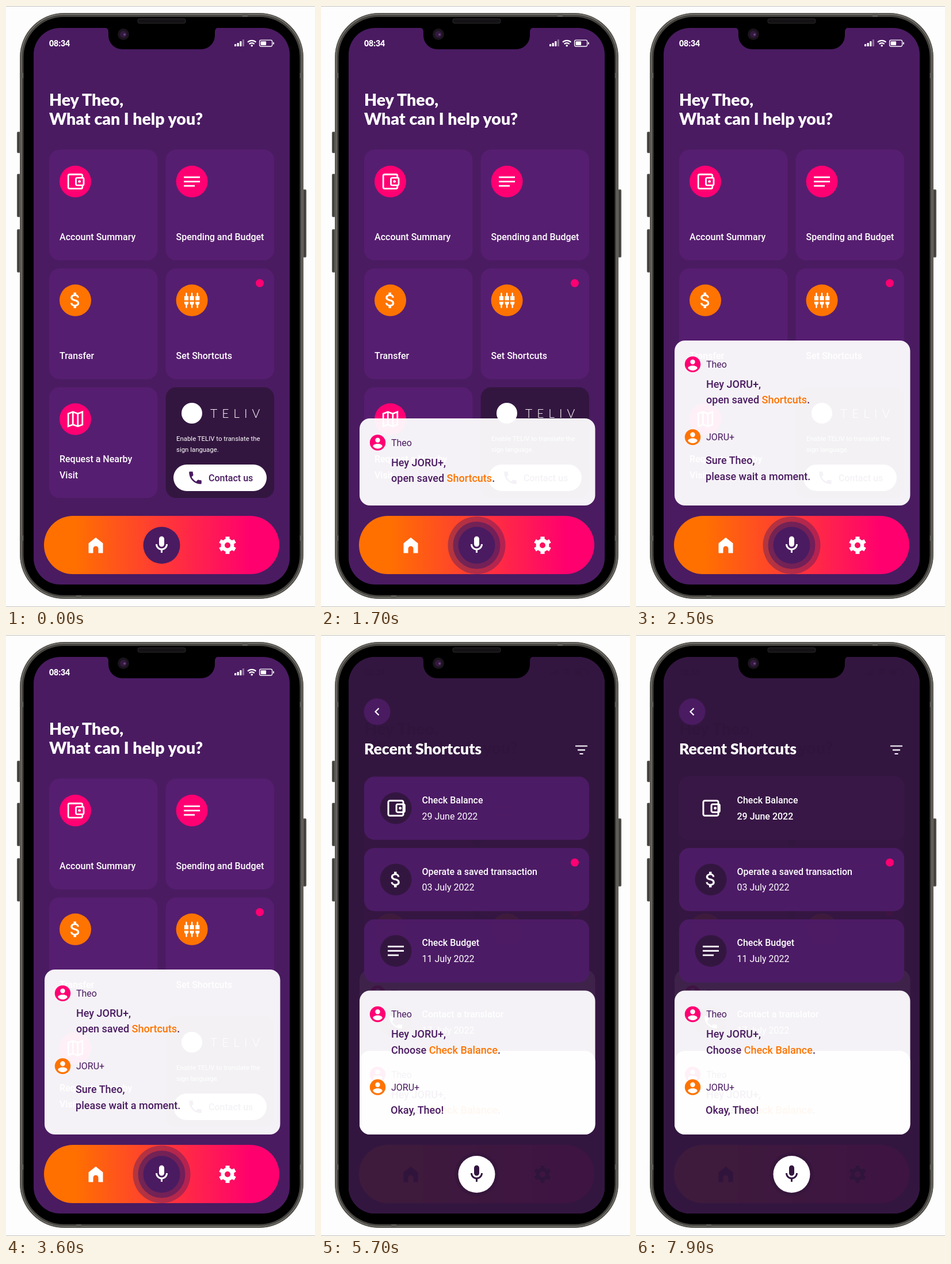
An HTML page for the animation above (8 s loop, 537x1042 px).

```html
<!DOCTYPE html>
<html lang="en">
<head>
<meta charset="utf-8">
<title>Voice banking</title>
<style>
html, body { margin: 0; width: 100%; height: 100%; overflow: hidden; background: #fefdfe; }
svg { display: block; width: 537px; height: 1042px; }
text { font-family: Roboto, Arial, sans-serif; font-size: 16px; white-space: pre; }
.ink { fill: var(--ink, #fff); }
.line { fill: none; stroke: var(--ink, #fff); stroke-width: 2.8; }
.plum { fill: #4a1b61; }
.mid { font-weight: 500; }
.say { font-weight: 500; font-size: 18px; }
.head { font-family: Lato, "Open Sans", sans-serif; font-weight: 900; }
.ghost { --ink: #000; opacity: .055; }
</style>
</head>
<body>
<svg id="stage" viewBox="0 0 537 1042"></svg>
<script>
const PINK = '#ff0073', ORANGE = '#ff7300', PLUM = '#4a1b61', DARK = '#331640';
const USER = 'Theo', BOT = 'JORU+', PARTNER = 'TELIV';
const LOOP = 8000, STEP = 100;

const text = (x, y, s, cls = 'ink mid', extra = '') =>
  `<text x="${x}" y="${y}" class="${cls}" ${extra}>${s}</text>`;
const heading = (x, y, s, size) => text(x, y, s, 'ink head', `style="font-size:${size}px"`);
const rect = (x, y, w, h, r, fill, extra = '') =>
  `<rect x="${x}" y="${y}" width="${w}" height="${h}" rx="${r}" fill="${fill}" ${extra}/>`;
const disc = (x, y, r, fill, extra = '') =>
  `<circle cx="${x}" cy="${y}" r="${r}" fill="${fill}" ${extra}/>`;
const at = (x, y, body, scale = 1) =>
  `<g transform="translate(${x} ${y}) scale(${scale})">${body}</g>`;
const path = (d, cls = 'ink', extra = '') => `<path class="${cls}" d="${d}" ${extra}/>`;
const glyph = d => `<path transform="translate(-12 -12)" d="${d}"/>`;

// Icons are centred on the origin.
const plug = 'M-1-10a1 1 0 0 1 2 0v4h2v6h-6v-6h2zM-3 2h6v2a3 3 0 0 1-2 2.8V11h-2V6.8A3 3 0 0 1-3 4z';
const icon = {
  wallet: `<rect class="line" x="-12.3" y="-12.3" width="24.6" height="24.6" rx="2.5"/>` +
    `<rect class="line" x="1" y="-6.5" width="13.5" height="13" rx="2" style="fill:var(--back)"/>` +
    `<circle class="ink" cx="7.2" r="2.3"/>`,
  lines: path('M-14-7.5h28M-14 0h28M-14 7.5h19', 'line'),
  plugs: [-8, 0, 8].map(x => at(x, 0, path(plug))).join(''),
  map: path('M-12.3-9.5l8-3 8.6 3 8-3v22l-8 3-8.6-3-8 3zM-4.3-12.5v22M4.3-9.5v22', 'line'),
  money: `<g class="ink">${glyph('M11.8 10.9c-2.27-.59-3-1.2-3-2.15 0-1.09 1.01-1.85 2.7-1.85 1.78 0 2.44.85 2.5 2.1h2.21c-.07-1.72-1.12-3.3-3.21-3.81V3h-3v2.16c-1.94.42-3.5 1.68-3.5 3.61 0 2.31 1.91 3.46 4.7 4.13 2.5.6 3 1.48 3 2.41 0 .69-.49 1.79-2.7 1.79-2.06 0-2.87-.92-2.98-2.1h-2.2c.12 2.19 1.76 3.42 3.68 3.83V21h3v-2.15c1.95-.37 3.5-1.5 3.5-3.55 0-2.84-2.43-3.81-4.7-4.4z')}</g>`,
  phone: glyph('M6.62 10.79c1.44 2.83 3.76 5.14 6.59 6.59l2.2-2.2c.27-.27.67-.36 1.02-.24 1.12.37 2.33.57 3.57.57.55 0 1 .45 1 1V20c0 .55-.45 1-1 1-9.39 0-17-7.61-17-17 0-.55.45-1 1-1h3.5c.55 0 1 .45 1 1 0 1.25.2 2.45.57 3.57.11.35.03.74-.25 1.02z'),
  mic: glyph('M12 14c1.66 0 3-1.34 3-3V5c0-1.66-1.34-3-3-3S9 3.34 9 5v6c0 1.66 1.34 3 3 3zm5-3c0 2.76-2.24 5-5 5s-5-2.24-5-5H5c0 3.53 2.61 6.43 6 6.92V21h2v-3.08c3.39-.49 6-3.39 6-6.92z'),
  house: path('M-12.5-3.5L0-13.5 12.5-3.5V13.5H4.5V6a4.5 4.5 0 0 0-9 0v7.5h-8z'),
  gear: `<g class="line"><circle r="8.2" style="stroke-width:6.4"/>` +
    [0, 60, 120].map(a => `<path d="M0-15v5M0 10v5" style="stroke-width:7" transform="rotate(${a})"/>`).join('') + '</g>'
};

const badge = (x, y, color, body, scale = 1) =>
  `<g style="--back:${color}">${disc(x, y, 27.5, color)}${at(x, y, body, scale)}</g>`;

function tile(col, row, color, body, labels, scale) {
  const x = 75 + col * 202.6, y = 249 + row * 206;
  return rect(x, y, 188.5, 192, 18, '#561e70') +
    badge(x + 45.5, y + 55.3, color, body, scale) +
    labels.map((s, i) => text(x + 18, y + 157 + (i - labels.length + 1) * 27.5 + (labels.length - 1) * 12.5 - 0, s)).join('');
}

const visitLabel = text(93, 791, 'Request a Nearby') + text(93, 818.5, 'Visit');

const partnerCard = rect(277.6, 661, 188.5, 192, 18, DARK) +
  disc(323, 706, 18, '#fff') +
  text(355, 714, PARTNER, 'ink', 'style="font:300 21px Lato,sans-serif;letter-spacing:8px"') +
  text(296, 754, `Enable ${PARTNER} to translate the`, 'ink', 'style="font-size:11.4px"') +
  text(296, 773, 'sign language.', 'ink', 'style="font-size:11.4px"') +
  rect(291, 795, 162, 46, 23, '#fff') +
  `<g class="plum">${at(329, 818, icon.phone, 1.2)}</g>` + text(352, 823.5, 'Contact us', 'plum mid');

const statusBar = heading(75, 70, '08:34', 14) +
  [4, 6, 9, 12].map((h, i) => `<rect class="ink" x="${397 + i * 4.6}" y="${70 - h}" width="3.2" height="${h}" rx=".7" opacity="${i < 3 ? 1 : .35}"/>`).join('') +
  path('M420 62.8a10.3 10.3 0 0 1 14.4 0M422.7 66a6.5 6.5 0 0 1 9 0', 'line', 'style="stroke-width:2.2"') +
  `<circle class="ink" cx="427.2" cy="68.8" r="1.8"/>` +
  `<rect class="line" x="440.6" y="59.2" width="22" height="10.8" rx="2.5" style="stroke-width:1.3"/>` +
  `<rect class="ink" x="442.6" y="61.2" width="9.5" height="6.8" rx="1"/><rect class="ink" x="464" y="62.5" width="1.8" height="4.2" rx=".9"/>`;

const homeContent = statusBar +
  heading(75, 173, `Hey ${USER},`, 28.5) +
  heading(75, 205.5, 'What can I help you?', 28.5) +
  tile(0, 0, PINK, icon.wallet, ['Account Summary']) +
  tile(1, 0, PINK, icon.lines, ['Spending and Budget']) +
  tile(0, 1, ORANGE, icon.money, ['Transfer'], 1.5) +
  tile(1, 1, ORANGE, icon.plugs, ['Set Shortcuts'], 1.2) +
  tile(0, 2, PINK, icon.map, []) + visitLabel +
  disc(441, 480.5, 7, PINK) + partnerCard +
  rect(66, 884, 409, 101, 50.5, 'url(#warm)') +
  at(156, 935, icon.house) + at(385, 935, icon.gear);

// A chat entry: y is the avatar centre, lines are [offset, markup].
function entry(y, color, name, lines, x = 122) {
  return disc(98.5, y, 13.7, color) + disc(98.5, y - 4.2, 4.2, '#fff') +
    `<path d="M90.3 ${y + 6.6}c0-6 16.4-6 16.4 0q-3 4-8.2 4t-8.2-4z" fill="#fff"/>` +
    text(122, y + 5.7, name, 'plum') +
    lines.map(([dy, s]) => text(x, y + dy, s, 'plum say')).join('');
}
const hot = s => `<tspan fill="${ORANGE}">${s}</tspan>.`;
const panel = (y, id = '') => rect(67, y, 409.5, 866 - y, 18, '#fff', `opacity=".94" ${id}`);
const choose = y => entry(y, PINK, USER, [[40.5, `Hey ${BOT},`], [68, 'Choose ' + hot('Check Balance')]]);

function shortcut(i, title, date, body, scale) {
  const y = 245.5 + i * 123.7;
  return rect(75, y, 391, 109.5, 18, '#4e1c67', 'opacity=".96"') + disc(130, y + 54.8, 27.5, DARK) +
    rect(75, y, 391, 109.5, 18, '#371845', `id="dim${i}" opacity="0"`) +
    `<g style="--back:transparent">${at(130, y + 54.8, body, scale)}</g>` +
    text(175.5, y + 46.5, title) + text(175.5, y + 74, date, 'ink', `id="date${i}"`);
}

const dark = rect(48, 38, 445, 965, 46, DARK) +
  `<g class="ghost"><use href="#home"/><use href="#talk"/></g>` +
  disc(97.5, 133, 23, PLUM) + path('M100.5 127l-6 6 6 6', 'line', 'style="stroke-width:2.2"') +
  heading(75, 206.5, 'Recent Shortcuts', 26.5) +
  path('M442 192.5h21M446 199.3h13M449.5 206h6', 'line', 'style="stroke-width:2.2"') +
  shortcut(0, 'Check Balance', '29 June 2022', icon.wallet, 1.06) +
  shortcut(1, 'Operate a saved transaction', '03 July 2022', icon.money, 1.5) +
  shortcut(2, 'Check Budget', '11 July 2022', icon.lines) +
  shortcut(3, 'Contact a translator', '17 July 2022', `<g class="ink">${icon.phone}</g>`, 1.2) +
  disc(441, 394.5, 7, PINK) +
  disc(270.5, 935, 38, '#2b1237', 'opacity=".35"') +
  disc(270.5, 935, 32, PLUM, 'id="micDisc"') +
  `<g id="mic" fill="#fff">${at(270.5, 934.5, icon.mic, 1.5)}</g>` +
  `<g id="ask">${panel(721)}${choose(762)}</g>` +
  `<g id="reply">${panel(616.5)}${choose(657.5)}${entry(784, ORANGE, BOT, [[46, `Okay, ${USER}!`]], 121)}</g>`;

const button = (x, y, h) => rect(x, y, 6, h, 2, '#55534e') + rect(x + 2, y + 2, 1.5, h - 4, 0, '#37352f');
const body = rect(0, 0, 537, 1, 0, '#c4c3c4') + rect(0, 1041, 537, 1, 0, '#c4c3c4') +
  button(19, 218, 37) + button(19, 291, 75) + button(19, 387, 75) + button(516, 318, 118) +
  rect(24.5, 12.5, 492, 1015, 76, '#45433f', 'stroke="#6b6963"') +
  rect(26.7, 14.7, 487.6, 1010.6, 74, 'none', 'stroke="#85827b" stroke-width="1.2"') +
  [[24, 116, 7, 9], [510, 116, 7, 9], [24, 918, 7, 9], [510, 918, 7, 9], [411, 12, 9, 7], [122, 1021, 9, 7]]
    .map(b => rect(...b, 0, '#5d5b56')).join('') +
  rect(30.5, 19, 480, 1002.5, 70, '#000') +
  rect(229, 22, 83, 8, 3, '#141214', 'stroke="#2a282a"');

const notch = `<path d="M171 37q7 1 7 8v6a24 24 0 0 0 24 24h137a24 24 0 0 0 24-24v-6q0-7 7-8z"/>` +
  disc(204, 49, 10, '#1a141c') + disc(204, 49, 6, '#321a3d') + disc(206, 49.5, 2, '#6a4080');

stage.innerHTML = `<defs><linearGradient id="warm"><stop offset=".13" stop-color="#ff7000"/><stop offset=".88" stop-color="#ff006e"/></linearGradient></defs>` +
  body + rect(48, 38, 445, 965, 46, PLUM) +
  `<g id="home">${homeContent}</g>` +
  `<g id="rings">${disc(270.5, 935, 50, PLUM, 'opacity=".42"')}${disc(270.5, 935, 41, PLUM, 'opacity=".6"')}</g>` +
  disc(270.5, 935, 32, PLUM) + `<g fill="#fff">${at(270.5, 934.5, icon.mic, 1.5)}</g>` +
  `<g id="talk">${panel(715, 'id="sheet"')}` +
  `<g id="request">${entry(757, PINK, USER, [[40.5, `Hey ${BOT},`], [68, 'open saved ' + hot('Shortcuts')]])}</g>` +
  `<g id="answer">${entry(747.5, ORANGE, BOT, [[46.5, `Sure ${USER},`], [74, 'please wait a moment.']], 121)}</g></g>` +
  `<g id="dark">${dark}</g>` + notch;

const $ = id => document.getElementById(id);
const set = (id, attrs) => { for (const k in attrs) $(id).setAttribute(k, attrs[k]); };
const span = (t, from, to) => Math.min(1, Math.max(0, (t - from) / (to - from)));
const easeOut = p => 1 - (1 - p) ** 3;
const slideIn = (id, p, dist) => set(id, { opacity: p, transform: `translate(0 ${dist * (1 - p)})` });

function draw(t) {
  const open = easeOut(span(t, 50, 450));
  slideIn('talk', open, 40);
  set('rings', { opacity: open });

  const grow = easeOut(span(t, 1900, 2350));
  set('sheet', { y: 715 - 135 * grow, height: 151 + 135 * grow });
  set('request', { transform: `translate(0 ${-135.7 * grow})` });
  set('answer', { opacity: grow });

  set('dark', { opacity: easeOut(span(t, 3700, 4200)) });

  const ask = easeOut(span(t, 5100, 5400));
  slideIn('ask', ask, 20);
  set('micDisc', { fill: ask > .5 ? '#fff' : PLUM });
  set('mic', { fill: ask > .5 ? DARK : '#fff' });
  slideIn('reply', easeOut(span(t, 5400, 5700)), 20);

  const pick = easeOut(span(t, 7300, 7800));
  set('dim0', { opacity: .95 * pick });
  set('date0', { 'font-weight': pick > .5 ? 500 : 400 });
}

const start = performance.now();
function tick(now) {
  const t = Math.max(0, now - start) % LOOP;
  draw(Math.floor(t / STEP) * STEP);
  requestAnimationFrame(tick);
}
draw(0);
requestAnimationFrame(tick);
</script>
</body>
</html>
```
